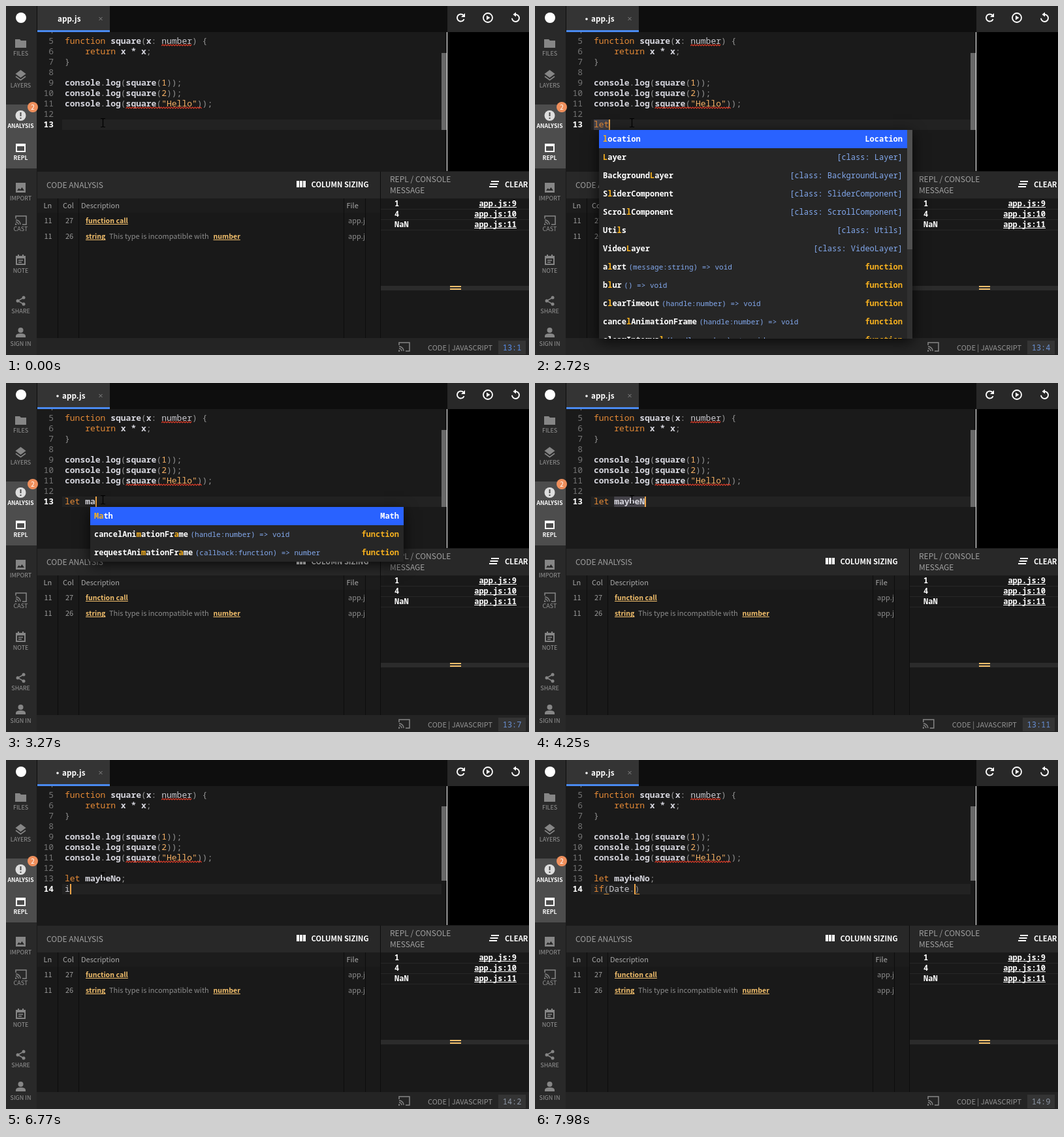
An HTML page with a canvas that plays this animation: 801 by 535 pixels, repeating every 8000 ms.

```html
<!DOCTYPE html>
<html lang="en">
<head>
<meta charset="utf-8">
<title>Code editor</title>
<style>
  html, body { margin: 0; width: 100%; height: 100%; overflow: hidden; background: #181818; }
  canvas { display: block; }
</style>
</head>
<body>
<canvas id="stage" width="801" height="535"></canvas>
<script>
const ctx = document.getElementById('stage').getContext('2d');
const UI = '"Noto Sans CJK JP", "Noto Sans CJK SC", "Noto Sans", "Open Sans", sans-serif';
const MONO = '"Noto Sans Mono", "DejaVu Sans Mono", monospace';
const LOOP = 8000, CELL = 7.8, CODE_X = 90, LINE = 16, BLINK = 540;
const GOLD = '#f5b01f', LINK = '#f2bf6c', ICON = '#868686', BAR = '#282828';

// Each step: time, typed text, suggestion prefix, word start to mark (-1: none)
const STEPS = [
  [0, ''],
  [2160, 'l'], [2270, 'l', '', 0], [2390, 'l', 'l', 0], [2500, 'le', 'l', 0],
  [2610, 'let', 'l', 0], [2820, 'let', '', 0],
  [2940, 'let '], [3050, 'let m'], [3160, 'let ma', 'm'], [3270, 'let ma', 'ma'],
  [3370, 'let may', 'ma'], [3480, 'let may', '', 4], [3590, 'let mayb', '', 4],
  [3820, 'let maybe'], [3920, 'let maybe', '', 4],
  [4130, 'let maybeN'], [4250, 'let maybeN', '', 4],
  [4680, 'let maybeNo'], [4800, 'let maybeNo', '', 4],
  [5120, 'let maybeNo;'], [5670, 'let maybeNo;\n'],
  [6770, 'let maybeNo;\ni'], [6880, 'let maybeNo;\ni', 'i', 0],
  [6990, 'let maybeNo;\nif', 'i', 0], [7100, 'let maybeNo;\nif', '', 0],
  [7210, 'let maybeNo;\nif('], [7430, 'let maybeNo;\nif(D'],
  [7540, 'let maybeNo;\nif(Da', 'D'], [7660, 'let maybeNo;\nif(Dat', 'Da'],
  [7770, 'let maybeNo;\nif(Date', 'Dat'], [7880, 'let maybeNo;\nif(Date', 'Date'],
  [7980, 'let maybeNo;\nif(Date.']
];

const CODE = ['', 'function square(x: number) {', '    return x * x;', '}', '',
  'console.log(square(1));', 'console.log(square(2));', 'console.log(square("Hello"));', ''];

const classOf = name => [name, `[class: ${name}]`];
const func = (name, args, result) => [name, 'function', `(${args}) => ${result}`];
const SYMBOLS = [
  ['location', 'Location'], ['Math', 'Math'], ['Date', 'Date'],
  ...['Layer', 'BackgroundLayer', 'SliderComponent', 'ScrollComponent', 'Utils', 'VideoLayer'].map(classOf),
  func('alert', 'message:string', 'void'), func('blur', '', 'void'),
  func('clearTimeout', 'handle:number', 'void'),
  func('cancelAnimationFrame', 'handle:number', 'void'),
  func('clearInterval', 'handle:number', 'void'),
  func('requestAnimationFrame', 'callback:function', 'number')
];

function text(str, x, y, color, size, { weight = 400, align = 'left', font = UI, underline = false } = {}) {
  ctx.font = `${weight} ${size}px ${font}`;
  ctx.textAlign = align;
  ctx.fillStyle = color;
  ctx.fillText(str, x, y);
  if (!underline) return;
  const width = ctx.measureText(str).width;
  ctx.fillRect(align === 'right' ? x - width : x, y + 1, width, 1);
}
const mono = (str, x, y, color, size, options) => text(str, x, y, color, size, { font: MONO, ...options });

function rect(x, y, w, h, color) {
  ctx.fillStyle = color;
  ctx.fillRect(x, y, w, h);
}
function shape(path, color, width) {
  const p = new Path2D(path);
  if (width) {
    ctx.strokeStyle = color;
    ctx.lineWidth = width;
    ctx.stroke(p);
  } else {
    ctx.fillStyle = color;
    ctx.fill(p, 'evenodd');
  }
}
function disc(x, y, r, color, width, from = 0, to = 2 * Math.PI) {
  ctx.beginPath();
  ctx.arc(x, y, r, from, to);
  ctx.fillStyle = ctx.strokeStyle = color;
  ctx.lineWidth = width || 1;
  width ? ctx.stroke() : ctx.fill();
}
function clipped(x, y, w, h, draw) {
  ctx.save();
  ctx.beginPath();
  ctx.rect(x, y, w, h);
  ctx.clip();
  draw();
  ctx.restore();
}
function squiggle(column, length, y) {
  const left = CODE_X + column * CELL;
  let path = `M${left} ${y + 1}`;
  for (let d = 2; d <= length * CELL; d += 2) path += `L${left + d} ${y + (d % 4 ? -1 : 1)}`;
  shape(path, '#e03c28', 1.1);
}
function castIcon(x, y) {
  shape(`M${x} ${y + 4}v-4h16v13h-6M${x} ${y + 6}a7 7 0 0 1 7 7M${x} ${y + 9}a4 4 0 0 1 4 4`, ICON, 1.5);
  rect(x - 1, y + 11.5, 2.2, 2.2, ICON);
}

function drawSidebar() {
  rect(0, 0, 47, 535, '#292929');
  rect(0, 151, 47, 98, '#4d4d4d');
  disc(23, 18, 8, '#fff');
  shape('M14 51h7l2 2h8v11h-17z', ICON);
  shape('M22.5 98l8 6-8 6-8-6z', ICON);
  shape('M15 108l7.5 5.5 7.5-5.5', ICON, 1.6);
  disc(22.5, 168, 8, '#dedede');
  rect(21.5, 163, 2, 6, '#4d4d4d');
  rect(21.5, 171, 2, 2, '#4d4d4d');
  shape('M15 211h15v13h-15zM17 215v7h11v-7z', '#fff');
  shape('M15 271h15v15h-15zM17 283h11l-3.5-5-2.7 3.5-2-2.3z', ICON);
  castIcon(15, 322);
  shape('M15 383h15v14h-15zM17 387v8h11v-8zM18 381h2v2h-2zM25 381h2v2h-2zM19 389h7v1.5h-7zM19 392h5v1.5h-5z', ICON);
  shape('M27 447L18 452L27 457', ICON, 1.5);
  [[27, 447], [18, 452], [27, 457]].forEach(([x, y]) => disc(x, y, 2.5, ICON));
  disc(22.5, 497, 4, ICON);
  shape('M15 508v-2q0-4 7.5-4t7.5 4v2z', ICON);

  [['FILES', 75.5], ['LAYERS', 125], ['ANALYSIS', 187, 1], ['REPL', 236, 1], ['IMPORT', 298],
   ['CAST', 345], ['NOTE', 409], ['SHARE', 471], ['SIGN IN', 521]].forEach(([label, y, active]) =>
    text(label, 22.5, y, active ? '#fff' : '#989898', active ? 8.6 : 9, { weight: active ? 600 : 400, align: 'center' }));
  disc(41, 155, 8, '#ef8f5c');
  text('2', 41, 159, '#fff', 10, { align: 'center' });
}

function drawToolbar(modified) {
  rect(47, 0, 629, 40, '#0e0e0e');
  rect(676, 0, 125, 40, BAR);
  rect(48, 0, 111, 40, '#343434');
  rect(48, 37, 111, 3, '#4a8af0');
  if (modified) disc(79, 20, 1.8, '#fff');
  text('app.js', modified ? 86 : 79, 24, '#fff', 11.7, { weight: 600 });
  shape('M142.5 17l5 5m0-5l-5 5', '#858585', 1);
  disc(696.5, 18, 5.5, '#fff', 1.9, 0.4, 5.5);
  shape('M703 11v6h-6z', '#fff');
  disc(738, 18, 7, '#fff', 1.8);
  shape('M736 14.5l5.5 3.5-5.5 3.5z', '#fff');
  disc(780.5, 18.5, 5.5, '#fff', 1.9, -1.6, 3.1);
  shape('M781 9.5v7l-4.5-3.5z', '#fff');
}

function drawCodeLine(line, y) {
  let x = CODE_X;
  for (const token of line.match(/"[^"]*"|\w+|\s+|./g) || []) {
    let color = '#949494', weight = 400;
    if (/^(function|return|let|if)$/.test(token)) color = '#e58a36';
    else if (/^["\d]/.test(token)) color = '#f5b165';
    else if (/^(number|Date|i)$/.test(token)) color = '#c9c9cf';
    else if (/^[\w*]/.test(token)) { color = '#d6d6de'; weight = 600; }
    mono(token, x, y, color, 13, { weight });
    x += token.length * CELL;
  }
}

function drawEditor(typed, mark, cursorOn) {
  rect(47, 40, 628, 213, '#1a1a1a');
  const typedLines = typed.split('\n');
  const current = typedLines.length - 1;
  const row = typedLines[current];
  const top = 174 + current * LINE;
  const inCall = row.includes('(');
  rect(86, top, 581, LINE, '#222');
  if (mark >= 0) rect(CODE_X + mark * CELL, top, (row.length - mark) * CELL, LINE, '#45434a');

  clipped(47, 40, 620, 213, () => {
    [...CODE, ...typedLines].forEach((line, i) => {
      const y = 42 + i * LINE, active = i === CODE.length + current;
      mono(String(i + 4), 73, y, active ? '#fff' : '#757575', 13, { weight: active ? 700 : 400, align: 'right' });
      drawCodeLine(active && inCall ? line + ')' : line, y);
    });
  });
  squiggle(19, 6, 60);
  squiggle(12, 15, 156);
  if (inCall) [row.indexOf('('), row.length].forEach(c => rect(CODE_X + c * CELL, top + 15, CELL, 1, '#d9943c'));
  if (cursorOn) rect(Math.round(CODE_X + row.length * CELL), top, 2, LINE, '#f0a74a');
  shape('M145 172.5h2.5l1 1 1-1h2.5M148.5 173v11M145 185.5h2.5l1-1 1 1h2.5', '#000', 1.2);

  rect(667, 72 - current, 8, current ? 114 : 118, '#696969');
  rect(675, 40, 1, 213, '#fff');
  rect(676, 40, 125, 213, '#000');
}

function drawPanels() {
  rect(47, 253, 754, 257, '#191919');
  rect(48, 254, 525, 41, BAR);
  text('CODE ANALYSIS', 62, 278.5, '#a0a0a0', 12, { weight: 500 });
  [445, 450, 455].forEach(x => rect(x, 268, 4, 10, '#fff'));
  text('COLUMN SIZING', 467.5, 278, '#fff', 11.2, { weight: 600 });

  rect(48, 295, 525, 22, '#1c1c1c');
  [79, 111, 517, 550].forEach(x => rect(x, 295, 1, 214, '#0d0d0d'));
  [['Ln', 57.5], ['Col', 87], ['Description', 115], ['File', 521.5]].forEach(([label, x]) =>
    text(label, x, 310, '#a8a8a8', 11));
  [['27', 333], ['26', 357]].forEach(([column, y]) => {
    text('11', 58.5, y, '#9a9a9a', 11);
    text(column, 91, y, '#9a9a9a', 11);
    clipped(518, y - 14, 32, 20, () => text('app.js', 524, y, '#8c8c8c', 11));
  });
  const link = { weight: 600, underline: true };
  text('function call', 122, 333, LINK, 10.6, link);
  text('string', 122, 357, LINK, 10.6, link);
  text('This type is incompatible with', 158, 357, '#8c8c8c', 11);
  text('number', 317.5, 357, LINK, 10.6, link);

  rect(573, 254, 1, 255, '#0d0d0d');
  rect(574, 254, 227, 41, BAR);
  text('REPL / CONSOLE', 588, 270, '#a0a0a0', 12, { weight: 500 });
  text('MESSAGE', 588, 287, '#a0a0a0', 12, { weight: 500 });
  rect(743, 268, 12, 2, '#fff');
  rect(741.5, 272, 12, 2, '#fff');
  rect(740, 276, 12, 2, '#fff');
  text('CLEAR', 764, 278, '#fff', 11.2, { weight: 600 });
  [['1', 'app.js:9'], ['4', 'app.js:10'], ['NaN', 'app.js:11']].forEach(([value, place], i) => {
    const y = 307 + i * 16;
    mono(value, 595, y, '#fff', 12, { weight: 600 });
    mono(place, 782, y, '#fff', 12, { weight: 600, align: 'right', underline: true });
    rect(574, y + 4, 227, 1, '#272727');
  });
  rect(574, 429, 227, 7, '#2b2b2b');
  rect(680, 429, 17, 2, LINK);
  rect(680, 433, 17, 2, LINK);
}

function drawStatus(position, age) {
  rect(47, 509, 754, 26, '#242424');
  const shift = (position.length - 4) * 7.2;
  castIcon(602 - shift, 516);
  text('CODE | JAVASCRIPT', 646 - shift, 528, '#949494', 11);
  rect(754 - shift, 513, 42 + shift, 21, '#343434');
  const blue = Math.min(1, 0.15 + age / 200);
  const mix = (from, to) => Math.round(from + (to - from) * blue);
  mono(position, 789.5, 528, `rgb(${mix(150, 88)},${mix(150, 141)},${mix(150, 235)})`, 12, { align: 'right' });
}

// Matches the prefix as a subsequence, taking the rightmost place for each letter
function matchPlaces(name, prefix) {
  const places = [];
  let end = name.length;
  for (const letter of [...prefix.toLowerCase()].reverse()) {
    const at = name.toLowerCase().slice(0, end).lastIndexOf(letter);
    if (at < 0) return null;
    places.push(at);
    end = at;
  }
  return places;
}

function drawSuggestions(prefix, x, y) {
  const rows = SYMBOLS.map(s => [matchPlaces(s[0], prefix), ...s]).filter(r => r[0]);
  const height = Math.min(320, rows.length * 28);
  const scrolls = rows.length > 11;
  const width = scrolls ? 472 : 480;
  ctx.save();
  ctx.shadowColor = 'rgba(0,0,0,.75)';
  ctx.shadowBlur = 20;
  ctx.shadowOffsetY = 5;
  rect(x, y, 480, height, '#262626');
  ctx.restore();
  clipped(x, y, 480, height, () => {
    rect(x, y, width, 28, '#2962ff');
    rows.forEach(([places, name, kind, signature = ''], i) => {
      const base = y + 18 + i * 28, left = x + 6;
      [...name].forEach((letter, c) =>
        mono(letter, left + c * 7.2, base, places.includes(c) ? GOLD : '#fff', 12, { weight: 600 }));
      mono(signature, left + name.length * 7.2 + 3.5, base, '#83a9ee', 11);
      const isClass = kind[0] === '[';
      const color = isClass ? '#83a9ee' : kind === 'function' ? GOLD : '#fff';
      mono(kind, x + width - 7, base, color, 12, { weight: isClass ? 400 : 600, align: 'right' });
    });
    if (scrolls) {
      rect(x + width, y, 8, height, '#303030');
      rect(x + width, y, 8, 183, '#505050');
    }
  });
}

function draw(t) {
  const step = STEPS.findLast(s => s[0] <= t);
  const [, typed, prefix = '', mark = -1] = step;
  const keyTime = typed ? STEPS.find(s => s[1] === typed)[0] : -650;
  const cursorOn = (t - keyTime) % (2 * BLINK) < BLINK;
  const lines = typed.split('\n');
  const row = lines.at(-1);

  drawToolbar(t >= 2390);
  drawEditor(typed, mark, cursorOn);
  drawPanels();
  drawStatus(`${12 + lines.length}:${row.length + 1}`, t - keyTime);
  drawSidebar();
  if (prefix) {
    const wordStart = row.search(/\w+$/);
    drawSuggestions(prefix, Math.round(CODE_X + (wordStart + 1) * CELL), 174 + lines.length * LINE);
  }
}

function frame() {
  draw(performance.now() % LOOP);
  requestAnimationFrame(frame);
}
frame();
</script>
</body>
</html>
```
